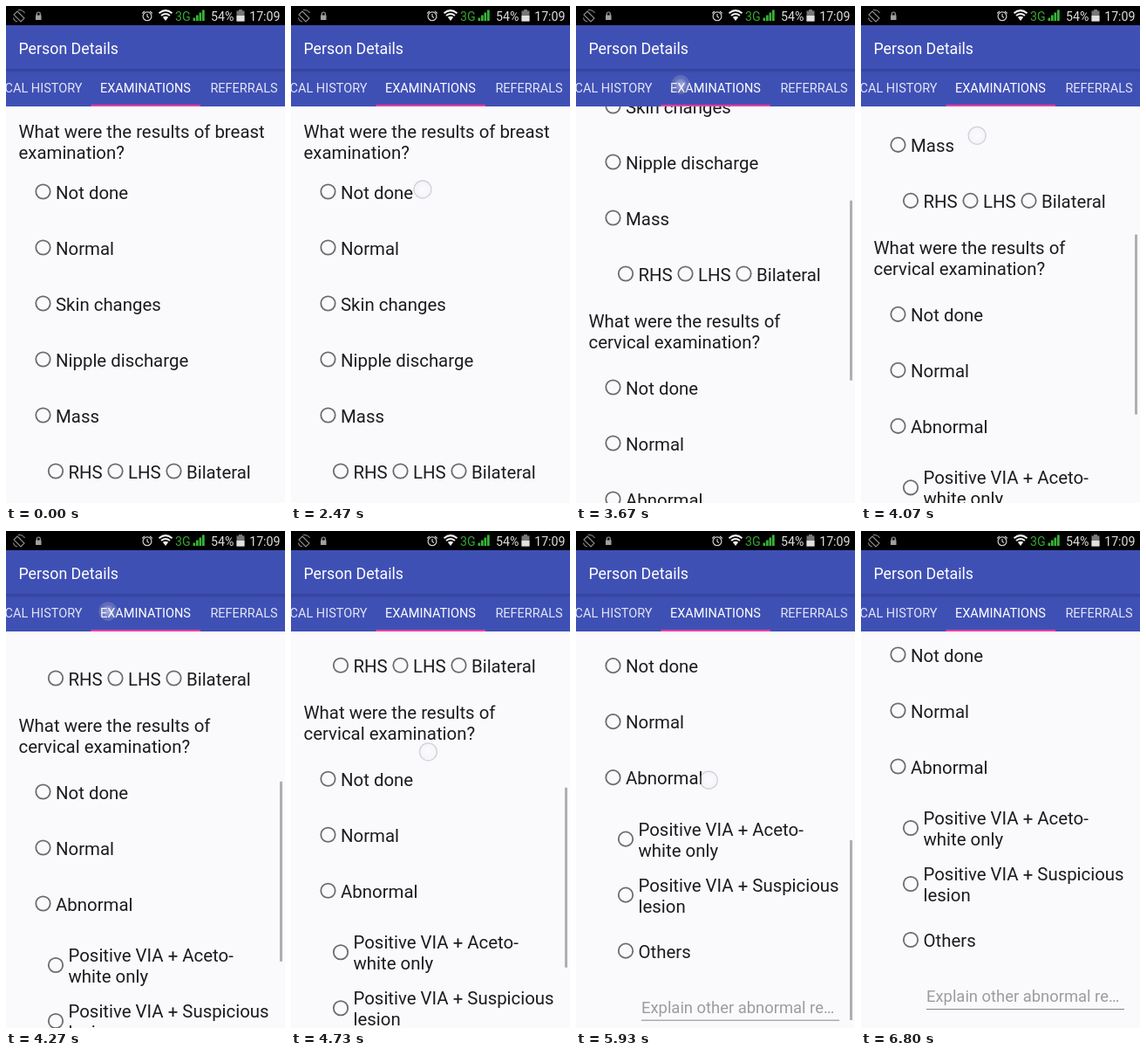
An HTML page with a canvas that plays this animation: 320 by 569 pixels, repeating every 7140 ms.

```html
<!DOCTYPE html>
<html lang="en">
<head>
<meta charset="utf-8">
<style>
html, body { margin: 0; overflow: hidden; }
canvas { display: block; width: 320px; height: 569px; }
</style>
</head>
<body>
<canvas></canvas>
<script>
const LOOP = 7140, FPS = 15, W = 320, H = 569, TOP = 115;
const canvas = document.querySelector('canvas');
const ctx = canvas.getContext('2d');
const dpr = window.devicePixelRatio || 1;
canvas.width = W * dpr;
canvas.height = H * dpr;

// Times are in steps of 1/15 s; "from" and "to" are finger positions.
const drags = [
  { down: 37, start: 37, end: 43, up: 44, from: [151, 210], to: [132, 115], scroll: [0, 89] },
  { down: 46, start: 47, end: 55, up: 56, from: [161, 230], to: [120, 90], scroll: [89, 226] },
  { down: 57, start: 57, end: 64, up: 67, from: [158, 235], to: [117, 92], scroll: [226, 364] },
  { down: 70, start: 70, end: 75, up: 80, from: [160, 268], to: [135, 122], scroll: [364, 506] },
  { down: 87, start: 87, end: 95, up: 97, from: [155, 300], to: [138, 205], scroll: [506, 521] }
];

const clamp = v => Math.max(0, Math.min(1, v));
const ramp = (t, a, b) => clamp((t - a) / (b - a));
const smooth = v => v * v * (3 - 2 * v);
const mix = (a, b, k) => a + (b - a) * k;

function rect(x, y, w, h, color) {
  ctx.fillStyle = color;
  ctx.fillRect(x, y, w, h);
}

function text(str, x, y, size = 20.4, color = '#1c1c1e', align = 'left') {
  ctx.font = `${size}px Roboto, sans-serif`;
  ctx.fillStyle = color;
  ctx.textAlign = align;
  ctx.fillText(str, x, y);
}

function stroke(path, color, width) {
  ctx.strokeStyle = color;
  ctx.lineWidth = width;
  ctx.stroke(new Path2D(path));
}

function fill(path, color) {
  ctx.fillStyle = color;
  ctx.fill(new Path2D(path));
}

function ring(x, y, r, color, width) {
  ctx.beginPath();
  ctx.arc(x, y, r, 0, 7);
  ctx.strokeStyle = color;
  ctx.lineWidth = width;
  ctx.stroke();
}

function radio(x, y, ...lines) {
  ring(x, y - 0.5, 8.2, '#6c6c6e', 1.8);
  const first = y + 7.5 - 12 * (lines.length - 1);
  lines.forEach((line, i) => text(line, x + 14.5, first + 24 * i));
}

function form() {
  text('What were the results of breast', 14.5, 151);
  text('examination?', 14.5, 175);
  ['Not done', 'Normal', 'Skin changes', 'Nipple discharge', 'Mass']
    .forEach((label, i) => radio(42.5, 213 + 64 * i, label));
  radio(57, 533, 'RHS');
  radio(125.5, 533, 'LHS');
  radio(192.5, 533, 'Bilateral');

  text('What were the results of', 14.5, 593.5);
  text('cervical examination?', 14.5, 617.5);
  ['Not done', 'Normal', 'Abnormal'].forEach((label, i) => radio(42.5, 663 + 64 * i, label));
  radio(57, 861.5, 'Positive VIA + Aceto-', 'white only');
  radio(57, 925.5, 'Positive VIA + Suspicious', 'lesion');
  radio(57, 989.5, 'Others');
  text('Explain other abnormal re…', 75, 1060, 18.4, '#9c9c9e');
  rect(75, 1068, 227, 1, '#868688');
}

function statusBar() {
  rect(0, 0, W, 22, '#000');
  stroke('M13 6 L21 14 L17 18 L9 10 Z M14 4.5 Q19 4 21.5 8 M8.5 13.5 Q9 17 13 18', '#8f8f8f', 1.1);
  rect(34, 10.5, 6.5, 5.5, '#a0a0a0');
  stroke('M35.3 11 V9 a2 2 0 0 1 4 0 V11', '#a0a0a0', 1.2);
  ring(162, 11.8, 4.9, '#d0d0d0', 1.2);
  stroke('M162 9 V12 L164 13.5 M156.3 8.5 L159 5.8 M165 5.8 L167.7 8.5', '#d0d0d0', 1.2);
  stroke('M175.5 8.2 Q183 2 190.5 8.2 M178 11 Q183 7 188 11', '#f0f0f0', 2);
  fill('M179.8 12.8 Q183 10.5 186.2 12.8 L183 17 Z', '#f0f0f0');
  text('3G', 194, 16.5, 14.2, '#37a437');
  for (let i = 0; i < 4; i++) rect(214.5 + 3.5 * i, 13.5 - 3 * i, 2.7, 3.5 + 3 * i, '#37b437');
  text('54%', 235, 16.5, 14.2, '#dedede');
  rect(267, 4, 4, 2, '#777');
  rect(264.5, 5.5, 9, 12, '#777');
  rect(264.5, 11, 9, 6.5, '#e0e0e0');
  text('17:09', 314.5, 16.5, 14.2, '#dedede', 'right');
}

function header() {
  rect(0, 22, W, TOP - 22, '#3f50b5');
  const shade = ctx.createLinearGradient(0, 72, 0, 77);
  shade.addColorStop(0, 'rgba(0,0,30,.2)');
  shade.addColorStop(1, 'rgba(0,0,30,0)');
  rect(0, 72, W, 5, shade);
  text('Person Details', 14.5, 54.5, 17.8, '#fff');
  text('CAL HISTORY', 87.5, 98.5, 14.5, '#e2e5f5', 'right');
  text('EXAMINATIONS', 160, 98.5, 14.5, '#fff', 'center');
  text('REFERRALS', 273, 98.5, 14.5, '#e2e5f5', 'center');
  rect(97.5, 113, 125.5, 2, '#f53d9c');
}

function scrollbar(scroll, t) {
  const alpha = t < 38 ? 0 : t < 87 ? 1 - ramp(t, 79, 83) : 1 - ramp(t, 97, 102);
  rect(314, 117.6 + scroll * 0.465, 3, 206, `rgba(70,70,75,${0.42 * alpha})`);
}

function overscrollGlow(t) {
  const pull = smooth(ramp(t, 89, 95)) * (1 - ramp(t, 96, 102));
  if (!pull) return;
  ctx.beginPath();
  ctx.ellipse(160, H, 190, 34 * pull, 0, 0, 7);
  ctx.fillStyle = `rgba(63,81,181,${0.16 * pull})`;
  ctx.fill();
}

function touch(x, y) {
  const light = ctx.createRadialGradient(x, y, 0, x, y, 10);
  light.addColorStop(0, 'rgba(255,255,255,.55)');
  light.addColorStop(0.5, 'rgba(245,245,255,.35)');
  light.addColorStop(1, 'rgba(220,220,235,.08)');
  ctx.beginPath();
  ctx.arc(x, y, 10, 0, 7);
  ctx.fillStyle = light;
  ctx.fill();
  ring(x, y, 10, 'rgba(150,150,160,.4)', 1.3);
}

function draw(ms) {
  const t = Math.floor(ms * FPS / 1000 + 0.1);
  let scroll = 0, finger = null;
  for (const d of drags) {
    if (t < d.down) break;
    const k = smooth(ramp(t, d.start, d.end));
    scroll = mix(...d.scroll, k);
    finger = t < d.up && d.from.map((v, i) => mix(v, d.to[i], k));
  }
  ctx.setTransform(dpr, 0, 0, dpr, 0, 0);
  rect(0, 0, W, H, '#faf9fb');
  ctx.save();
  ctx.translate(0, -scroll);
  form();
  ctx.restore();
  scrollbar(scroll, t);
  overscrollGlow(t);
  header();
  statusBar();
  if (finger) touch(...finger);
}

const began = performance.now();
function tick() {
  draw((performance.now() - began) % LOOP);
  requestAnimationFrame(tick);
}
tick();
</script>
</body>
</html>
```
